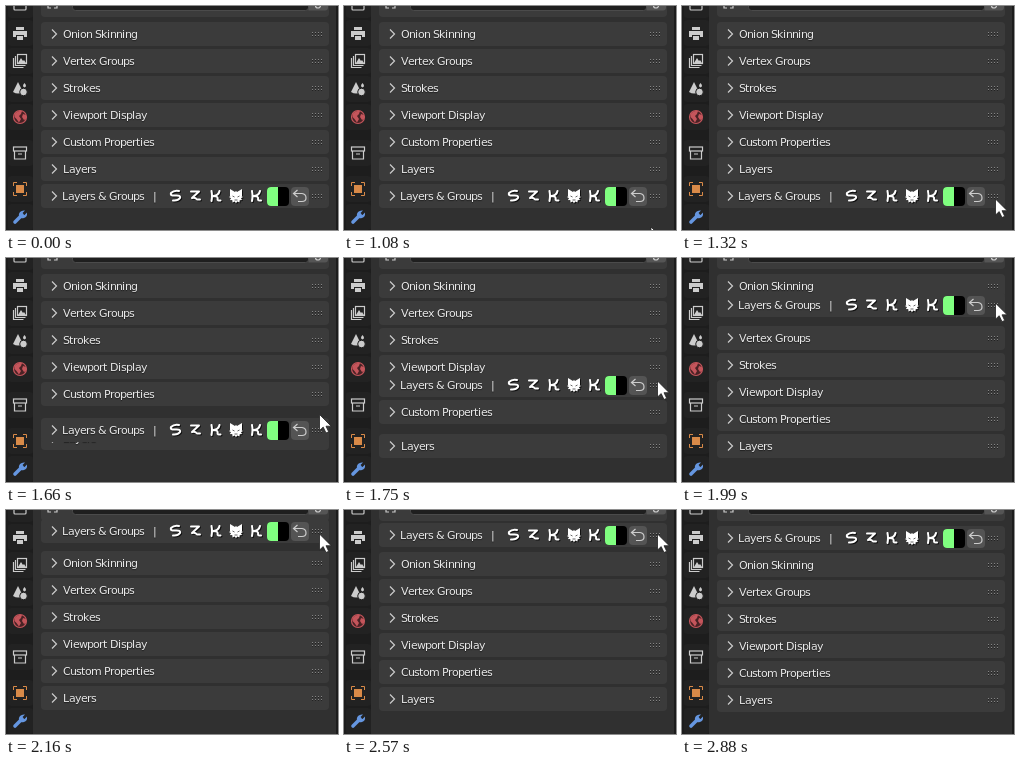
Write an HTML page that moves like this. It is 332 by 224 pixels and loops after 4.05 s.

```html
<!DOCTYPE html>
<html lang="en">
<head>
<meta charset="utf-8">
<title>Reordering panels</title>
<style>
  html, body { margin: 0; width: 100%; height: 100%; overflow: hidden; background: #303030; }
  svg { display: block; }
  text { font: 11px "DejaVu Sans", sans-serif; fill: #e8e8e8; text-shadow: 0 1px 1px rgba(0,0,0,.5); white-space: pre; }
  .line { fill: none; stroke: #ccc; stroke-width: 1.2; }
  .glyph { fill: none; stroke: #fff; stroke-width: 2; stroke-linecap: round; stroke-linejoin: round; filter: drop-shadow(1px 1px .6px #111); }
</style>
</head>
<body>
<svg id="stage" width="332" height="224" viewBox="0 0 332 224">
  <rect width="332" height="224" fill="#303030"/>
  <rect x="330" width="2" height="224" fill="#1c1c1c"/>

  <g id="header">
    <rect x="35" y="-10" width="288" height="21" rx="4" fill="#3b3b3b"/>
    <rect x="66.5" y="-10" width="236" height="14.5" rx="3" fill="#1f1f1f" stroke="#4b4b4b"/>
    <path d="M302.5 -1H322V1.5Q322 4.5 319 4.5H302.5Z" fill="#555"/>
    <circle cx="312" cy="-.5" r="2.5" class="line"/>
    <path d="M42 -1v3h3m3 0h3v-3" class="line"/>
  </g>

  <g id="tabs">
    <rect width="27" height="224" fill="#1d1d1d"/>
    <g id="tabBacks" fill="#222"></g>
    <rect x="8" y="-8" width="12" height="12" rx="1" class="line"/>
    <g transform="translate(14 27)">
      <path d="M-4 -6h8v3h-8z M-7 -2h14v6h-3v-2h-8v2h-3z M-3 3h6v4h-6z" fill="#ccc"/>
    </g>
    <g transform="translate(14 55)">
      <path d="M-6.5 -3v9.500h10M-4.500 -5v9.500h10" class="line" stroke-width="1"/>
      <rect x="-2.500" y="-6.500" width="9" height="9" class="line"/>
      <path d="M-2 2l3-5 2 3 1-1 2 3z" fill="#ccc"/>
    </g>
    <g transform="translate(14 83)" fill="#ccc">
      <path d="M-2 -7L3 3Q-2 6 -7 3Z"/>
      <circle cx="3.500" cy="3" r="3.800" stroke="#1d1d1d"/>
      <path d="M4.500 -6q3 3.500 0 4.500q-3 -1 0 -4.500"/>
    </g>
    <g transform="translate(14 111)">
      <circle r="6.500" fill="#4a2225" stroke="#c4555b" stroke-width="1.200"/>
      <path d="M-5.500 -3Q-2 -7 2 -6L1 -3 -1 -1 1 2 -1 5.500Q-3 2 -5.500 0Z M3 -3l3 1v4l-2 1-2-3z" fill="#c4555b"/>
    </g>
    <g transform="translate(14 147)" class="line">
      <rect x="-6.500" y="-6" width="13" height="4"/>
      <path d="M-5.500 -2v8h11v-8M-2 1h4"/>
    </g>
    <g transform="translate(14 183)">
      <rect x="-4" y="-4" width="8" height="8" fill="#d98a48"/>
      <path d="M-6.500 -3v-3.500h3.500M3 -6.500h3.500v3.500M6.500 3v3.500h-3.500M-3 6.500h-3.500v-3.500" fill="none" stroke="#d98a48"/>
    </g>
    <g transform="translate(14 211)">
      <path d="M-5 5L2 -2" stroke="#6596e0" stroke-width="3.600" stroke-linecap="round"/>
      <path d="M5 -6.500L2.500 -4 3 -2.500 4.500 -2 7 -4.500Q7.500 0 4 1 1 2 -1 0 -2 -3 0 -5 2 -7 5 -6.500Z" fill="#6596e0"/>
    </g>
  </g>

  <g id="panels"></g>

  <path id="cursor" d="M0 0V16L3.700 12.600 6.500 18.500 9.200 17.300 6.500 11.700H11.700Z" fill="#fff" stroke="#222" stroke-width=".8"/>
</svg>

<script>
const LOOP = 4050, TICK = 30, PITCH = 27, TOP = 28;
const DRAG_START = 1590, RELEASE = 2510, ANIMATION = 300;
const PUSH = 25;                                  // displacement of a passed panel
const PHASES = [0, 1080, 1630, 2130, 2540, 2790];

// Panel title and the moment the dragged panel passes it
const rows = [
  ["Onion Skinning", 2160], ["Vertex Groups", 1960], ["Strokes", 1840],
  ["Viewport Display", 1810], ["Custom Properties", 1750], ["Layers", 1630]
];
const dragPath = [[1630, 190], [1660, 172], [1720, 135], [1750, 127], [1780, 120],
  [1840, 78], [1870, 66], [1900, 63], [2130, 23], [2160, 21]];
const enterPath = [[1080, 307, 221], [1140, 309, 207], [1220, 312, 197], [1320, 313.5, 193]];
const exitPath = [[2760, 313.5, 24], [2790, 305, 17], [2820, 288, 8], [2850, 266, -4]];

const $ = id => document.getElementById(id);
const measurer = document.createElement("canvas").getContext("2d");
measurer.font = '110px "DejaVu Sans", sans-serif';

// Whole-pixel advances, rounded down per glyph
function label(x, string) {
  const xs = [...string].map(c => {
    const at = x;
    x += Math.floor(measurer.measureText(c).width / 10);
    return at;
  });
  return `<text x="${xs.join(" ")}" y="4" xml:space="preserve">${string.replace("&", "&amp;")}</text>`;
}

function grip() {
  let dots = "";
  for (let i = 0; i < 8; i++) {
    const x = 306 + (i % 4) * 3, y = i < 4 ? -2 : 1;
    dots += `<rect x="${x}" y="${y + 1}" width="1" height="1" fill="#222"/>
      <rect x="${x}" y="${y}" width="1" height="1" fill="#858585"/>`;
  }
  return dots;
}

const glyph = (x, d) => `<path class="glyph" transform="translate(${x} 0)" d="${d}"/>`;
const K = "M-4 -5Q-3 0 -4 5M4 -5Q3 0 -3 0Q3 0 2 3Q2 5 5 4.500";

function spikyHead() {
  const points = [];
  for (let i = 0; i < 24; i++) {
    const angle = i * Math.PI / 12, r = i % 2 ? 5.2 : 7;
    points.push(`${(r * Math.cos(angle)).toFixed(1)},${(r * .9 * Math.sin(angle) + 1).toFixed(1)}`);
  }
  return `<g transform="translate(230 0)" fill="#fff" style="filter:drop-shadow(1px 1px .5px #111)">
    <polygon points="${points.join(" ")}"/><path d="M-6 0L-6 -7 -1 -4H1L6 -7 6 0Z"/>
    <path d="M-3.500 0l2 1M3.500 0l-2 1M-1.500 4h3" stroke="#555" stroke-width=".9"/></g>`;
}

function toolbar() {
  return glyph(169, "M4 -5Q-1 -6 -4 -3Q-5 0 0 -.5Q6 -1 5 2Q3 5 -2 4.500") +
    glyph(189, "M-4 -4.500H4L-3 2Q0 1 2 3.500H5") + glyph(209.5, K) + spikyHead() + glyph(250, K) +
    `<rect x="261" y="-9" width="22" height="19" rx="4" fill="#000"/>
     <path d="M272 -9H265Q261 -9 261 -5V6Q261 10 265 10H272Z" fill="#80ff80"/>
     <rect x="285" y="-9" width="18" height="19" rx="4" fill="#545454"/>
     <path class="line" d="M291.500 -6L287.500 -2.500 291.500 1M288 -2.500H296Q300 -2 300 2Q300 5.500 296 5.500H292"/>`;
}

function addPanel(textX, title, extra = "") {
  const group = document.createElementNS("http://www.w3.org/2000/svg", "g");
  group.innerHTML = `<rect x="35" y="-12" width="288" height="24" rx="4" fill="#3b3b3b"/>
    <path class="line" d="M46 -4.500L50.500 0L46 4.500"/>` + label(textX, title) + extra + grip();
  $("panels").append(group);
  return group;
}

const panels = rows.map(([title]) => addPanel(57, title));
const dragged = addPanel(56, "Layers & Groups   |", toolbar());
$("tabBacks").innerHTML = [-1, 27, 55, 83, 111, 147, 183, 211]
  .map(y => `<rect x="2" y="${y - 13}" width="25" height="26" rx="3"/>`).join("");

function along(path, t) {
  const next = path.findIndex(p => p[0] > t);
  if (next === 0) return path[0].slice(1);
  if (next < 0) return path[path.length - 1].slice(1);
  const a = path[next - 1], b = path[next], f = (t - a[0]) / (b[0] - a[0]);
  return a.slice(1).map((v, i) => v + (b[i + 1] - v) * f);
}

// Each tick closes part of the gap; the part grows with the time since `start`
function approach(from, to, first, start, t) {
  let y = from;
  for (let tick = first; tick <= t && y !== to; tick += TICK) {
    const part = Math.min(1, Math.sqrt((tick - start) / ANIMATION));
    y = Math.round(y + (to - y) * part);
  }
  return y;
}

const settle = (from, to, t) => approach(from, to, RELEASE + TICK, RELEASE, t);
const place = (node, x, y) => node.setAttribute("transform", `translate(${x} ${y})`);

function cursorAt(t) {
  if (t < 1080 || t >= 2880) return null;
  if (t < 1630) return along(enterPath, t);
  if (t >= 2790) return along(exitPath, t);
  return [313.5, along(dragPath, t + TICK)[0] + 3];
}

function draw(time) {
  const base = PHASES.filter(p => p <= time).pop();
  const t = base + Math.floor((time - base) / TICK) * TICK;

  panels.forEach((panel, i) => {
    const home = TOP + PITCH * i;
    const pushed = approach(home, home + PUSH, rows[i][1], DRAG_START, t);
    place(panel, 0, settle(pushed, home + PITCH, t));
  });
  place(dragged, 0, settle(Math.round(along(dragPath, t)[0]), TOP, t));

  const tip = cursorAt(t);
  $("cursor").style.display = tip ? "" : "none";
  if (tip) place($("cursor"), ...tip);
}

const began = performance.now();
function frame() {
  draw((performance.now() - began) % LOOP);
  requestAnimationFrame(frame);
}
draw(0);
requestAnimationFrame(frame);
</script>
</body>
</html>
```
